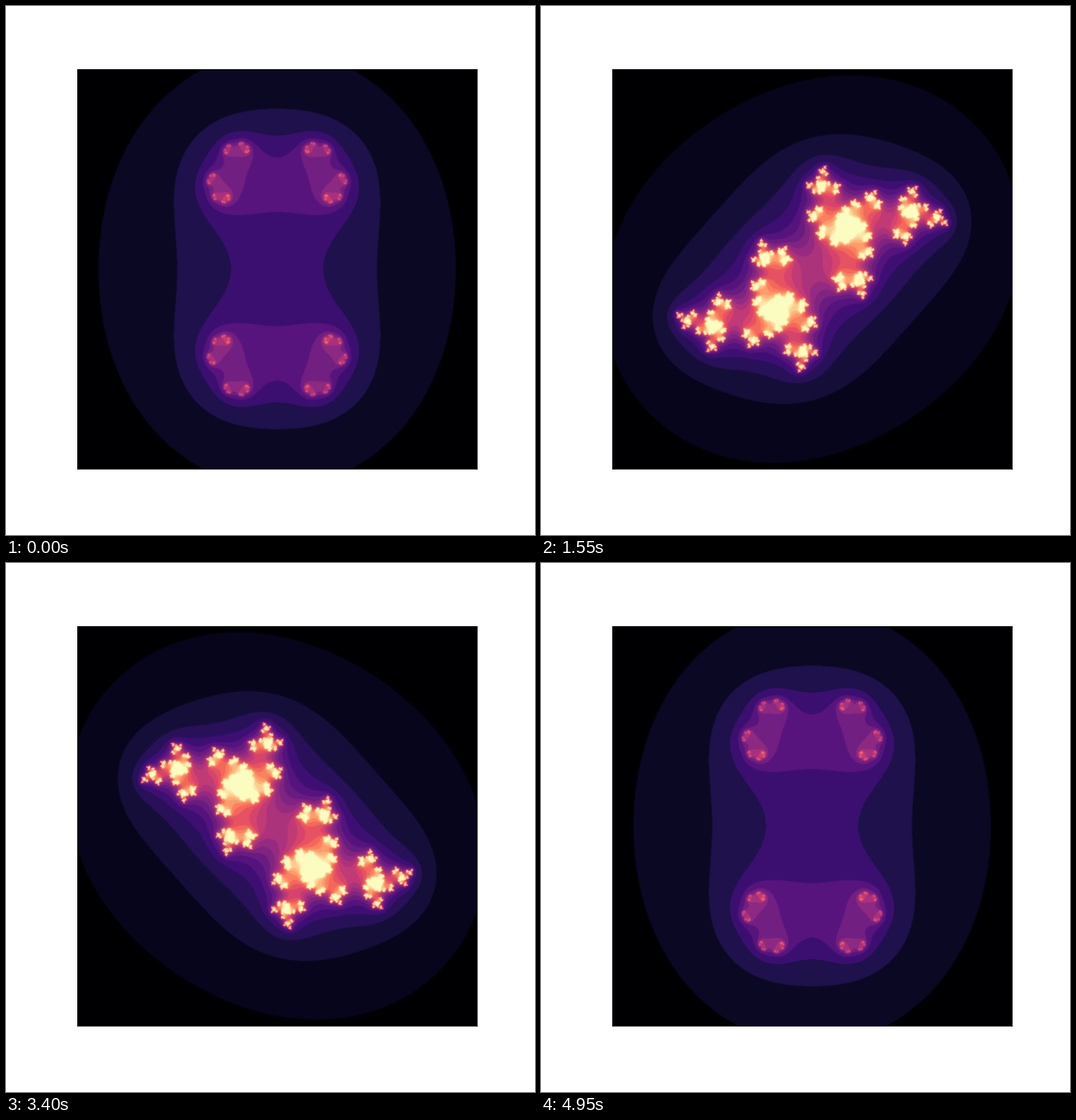
A matplotlib script for the animation above (5 s loop, 720x720 px).

```python
import matplotlib.pyplot as plt
import numpy as np
from matplotlib.animation import FuncAnimation

FRAMES = 100
SIZE = 800          # samples along each side of the plane
SPAN = 2.0          # the plane runs from -SPAN to SPAN
RADIUS = 0.7885     # the constant c travels on this circle
ESCAPE = 4.0
LAST = 19           # count given to points that never escape

axis = np.linspace(-SPAN, SPAN, SIZE)
angles = np.linspace(0, 2 * np.pi, FRAMES)

# Julia sets of z^2 + c are symmetric under z -> -z: half the plane is enough.
half = (axis[None, :] + 1j * axis[:SIZE // 2, None]).ravel()


def julia(c):
    """Escape counts of z -> z^2 + c over the whole plane."""
    counts = np.full(half.size, LAST, dtype=float)
    z, index = half, np.arange(half.size)
    for step in range(LAST):
        z = z * z + c
        alive = z.real ** 2 + z.imag ** 2 <= ESCAPE ** 2
        counts[index[~alive]] = step
        z, index = z[alive], index[alive]
    top = counts.reshape(SIZE // 2, SIZE)
    return np.vstack([top, top[::-1, ::-1]])


def field(frame):
    return julia(RADIUS * np.exp(1j * angles[frame]))


fig = plt.figure(figsize=(10, 10), dpi=72)
fig.subplots_adjust(left=0.125, right=0.9, bottom=0.125, top=0.88)
ax = fig.add_subplot()
ax.set_xticks([])
ax.set_yticks([])
image = ax.imshow(field(0), interpolation="bicubic", cmap="magma")


def animate(frame):
    image.set_data(field(frame))
    image.autoscale()   # colours span each frame's own range
    return [image]


anim = FuncAnimation(fig, animate, frames=FRAMES, interval=50,
                     repeat=True, repeat_delay=0, blit=False)
plt.show()
```
